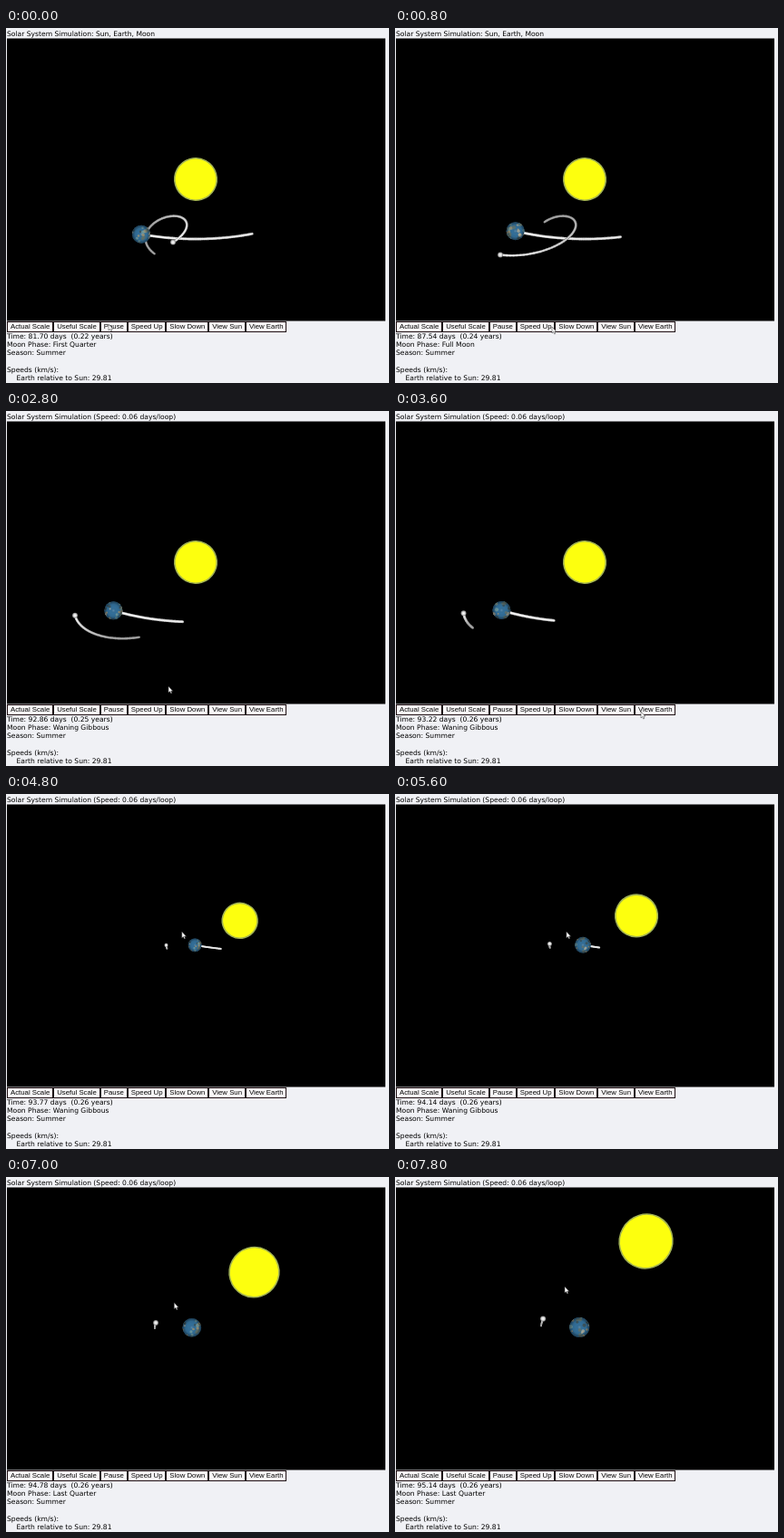
Write an HTML page with a canvas that moves like this. It is 422 px wide and 392 px high and loops after 8 s.

```html
<!DOCTYPE html>
<html lang="en">
<head>
<meta charset="utf-8">
<title>Solar System Simulation</title>
<style>
  html, body { margin: 0; width: 100%; height: 100%; overflow: hidden; background: #f0f1f5; }
  canvas, pre, nav, svg { position: absolute; left: 0; top: 0; margin: 0; }
  pre { left: 1px; font: 7.6px/9.28px "DejaVu Sans", sans-serif; color: #000; }
  #title { top: 2.2px; }
  #info { top: 335.8px; }
  #info span { margin-left: 10.5px; }
  nav { left: 1px; top: 324px; display: flex; font: 7.8px/9.5px "Liberation Sans", sans-serif; white-space: nowrap; }
  nav span { padding: 0 2.95px; border: 1px solid #1c0c10; background: #faf8f9; color: #000; }
</style>
</head>
<body>
<canvas id="space" width="422" height="392"></canvas>
<pre id="title"></pre>
<nav><span>Actual Scale</span><span>Useful Scale</span><span>Pause</span><span>Speed Up</span><span>Slow Down</span><span>View Sun</span><span>View Earth</span></nav>
<pre id="info"></pre>
<svg width="422" height="392">
  <path id="cursor" d="M0 0V7L1.6 5.6L2.7 8L3.8 7.5L2.8 5.2H4.8Z" fill="#fff" stroke="#333" stroke-width=".5"/>
</svg>
<script>
const $ = id => document.getElementById(id);
const ctx = $('space').getContext('2d');
const LOOP = 8000, STEP = 200, TAU = Math.PI * 2, RAD = Math.PI / 180;
const START_DAY = 81.7, LOOPS_PER_SECOND = 7.3;
const EARTH_LAG = 4.8, MOON_LAG = 2.33, VIEW_EARTH_AT = 4;
const SUN = [209, 167];
const slowDownClicks = [1.17, 1.6, 1.85, 2.2];
const speedLabels = ['0.50', '0.25', '0.12', '0.06'];
const phases = ['First Quarter', 'Waxing Gibbous', 'Full Moon', 'Waning Gibbous', 'Last Quarter'];
const cursorStops = [
  { at: .2, x: 113, y: 327 }, { at: 1, x: 193, y: 331 },
  { at: 2.2, x: 193, y: 331 }, { at: 2.8, x: 179, y: 304 },
  { at: 3.6, x: 271, y: 332 }, { at: 4, x: 271, y: 332 },
  { at: 4.6, x: 195, y: 152 }, { at: 6.4, x: 184, y: 152 }, { at: 7.8, x: 187, y: 121 }];

const mix = (a, b, u) => a + (b - a) * u;
const progress = (t, from, to) => Math.min(1, Math.max(0, (t - from) / (to - from)));

// Every click halves the speed; trails reach back to before the loop begins.
function dayAt(t) {
  if (t < 0) return START_DAY + 7.1 * t - .3 * t * t;
  const lost = slowDownClicks.reduce((sum, at, i) => sum + Math.max(0, t - at) / 2 ** (i + 1), 0);
  return START_DAY + LOOPS_PER_SECOND * (t - lost);
}

function earthOrbit(day) {
  const a = (19.8 + .9856 * (day - START_DAY)) * RAD;
  return [209 - 177 * Math.sin(a), 233 - 90 * (1 - Math.cos(a))];
}

function moonOffset(day) {
  const a = (20.5 + 13.18 * (day - START_DAY)) * RAD, s = Math.sin(a), near = 1 + .06 * s;
  return [(40.5 * Math.cos(a) - 10.5 * s) * near, 25 * s * near];
}

function viewAt(t) {
  if (t < VIEW_EARTH_AT) {
    return { anchor: SUN, orbit: [1, 1], moon: [1, 1], sunR: 24, earthR: 10, moonR: 3, trail: 1, turn: 0 };
  }
  const turn = progress(t, 6.4, 7.8), zoom = 1 + .32 * progress(t, 5, 6) + .16 * turn;
  return {
    anchor: earthOrbit(dayAt(VIEW_EARTH_AT)),
    sunOffset: [49.5 * zoom, -27 * zoom - 55 * turn],
    orbit: [.87 * zoom, .5 * zoom],
    moon: [.78 * zoom, .55 * zoom + .45 * turn],
    sunR: 20.2 * zoom, earthR: 7.4 * zoom, moonR: 2.1 * zoom, trail: .65, turn
  };
}

function cursorAt(t) {
  const next = cursorStops.findIndex(s => s.at > t);
  const b = cursorStops.at(next), a = next > 0 ? cursorStops[next - 1] : b;
  const u = progress(t, a.at, b.at) || 0;
  return [mix(a.x, b.x, u), mix(a.y, b.y, u)];
}

function disc(x, y, r, fill) {
  ctx.beginPath();
  ctx.arc(x, y, r, 0, TAU);
  ctx.fillStyle = fill;
  ctx.fill();
}

function shade(x, y, r, ...colors) {
  const g = ctx.createRadialGradient(x, y, 0, x, y, r);
  colors.forEach((c, i) => g.addColorStop(i / (colors.length - 1), c));
  return g;
}

function drawSun([x, y], r, stretch) {
  ctx.beginPath();
  ctx.ellipse(x, y, r - .8, r - .8 + stretch, .5, 0, TAU);
  ctx.fillStyle = '#fdff0e';
  ctx.fill();
  ctx.strokeStyle = '#a3b352';
  ctx.lineWidth = 1.6;
  ctx.stroke();
}

function drawEarth([x, y], r, day) {
  const land = ['#b89c6c', '#7fa6a2', '#6a7464', '#c2b79c', '#3f4a48'];
  let seed = 7;
  const random = () => (seed = seed * 16807 % 2147483647) / 2147483647;
  ctx.save();
  disc(x, y, r, '#336f99');
  ctx.clip();
  for (let i = 0; i < 36; i++) {
    const lon = random() * TAU + day * TAU, lat = Math.asin(random() * 2 - 1), size = .08 + .14 * random();
    if (Math.cos(lon) < 0) continue;
    ctx.globalAlpha = .7;
    disc(x + r * Math.sin(lon) * Math.cos(lat), y + r * Math.sin(lat), r * size, land[i % land.length]);
  }
  ctx.globalAlpha = 1;
  disc(x, y, r, shade(x, y, r, '#fff3', '#0000', '#0001', '#0007'));
  ctx.restore();
}

function drawTrail(from, to, place, width, bright) {
  const steps = 60;
  const points = Array.from({ length: steps + 1 }, (_, i) => place(mix(from, to, i / steps)));
  ctx.lineCap = 'round';
  for (const [scale, tone] of [[1, .62], [.6, 1]]) {
    for (let i = 0; i < steps; i++) {
      const grey = mix(bright, 245, progress(i / steps, .3, 1)) * tone;
      ctx.strokeStyle = `rgb(${grey},${grey},${grey})`;
      ctx.lineWidth = width * scale;
      ctx.beginPath();
      ctx.moveTo(...points[i]);
      ctx.lineTo(...points[i + 1]);
      ctx.stroke();
    }
  }
}

function drawSpace(t, day) {
  const view = viewAt(t);
  const earthAt = d => earthOrbit(d).map((v, i) => SUN[i] + (v - view.anchor[i]) * view.orbit[i]);
  const moonAt = d => {
    const offset = moonOffset(d);
    return earthAt(d).map((v, i) => v + offset[i] * view.moon[i]);
  };
  const earth = earthAt(day), moon = moonAt(day);
  const sun = view.sunOffset ? earth.map((v, i) => v + view.sunOffset[i]) : SUN;

  ctx.clearRect(0, 0, 422, 392);
  ctx.fillStyle = '#000';
  ctx.fillRect(1, 11.5, 417, 312);
  drawSun(sun, view.sunR, view.turn);
  drawTrail(dayAt(t - EARTH_LAG), day, earthAt, 2.9 * view.trail, 235);
  drawTrail(dayAt(t - MOON_LAG), day, moonAt, 2.6 * view.trail, 165);
  drawEarth(earth, view.earthR, day);
  disc(...moon, view.moonR, shade(...moon, view.moonR, '#fff', '#ddd', '#777'));
}

function render() {
  const t = Math.floor(performance.now() % LOOP / STEP) * STEP / 1000;
  const day = dayAt(t), clicks = slowDownClicks.filter(at => t >= at).length;
  const phase = phases[Math.floor((day - 79.4) / 3.69)];
  drawSpace(t, day);
  $('title').textContent = 'Solar System Simulation' +
    (clicks ? ` (Speed: ${speedLabels[clicks - 1]} days/loop)` : ': Sun, Earth, Moon');
  $('info').innerHTML = `Time: ${day.toFixed(2)} days  (${(day / 365.25).toFixed(2)} years)
Moon Phase: ${phase}
Season: Summer

Speeds (km/s):
<span>Earth relative to Sun: 29.81</span>`;
  $('cursor').setAttribute('transform', `translate(${cursorAt(t)})`);
  requestAnimationFrame(render);
}
render();
</script>
</body>
</html>
```
